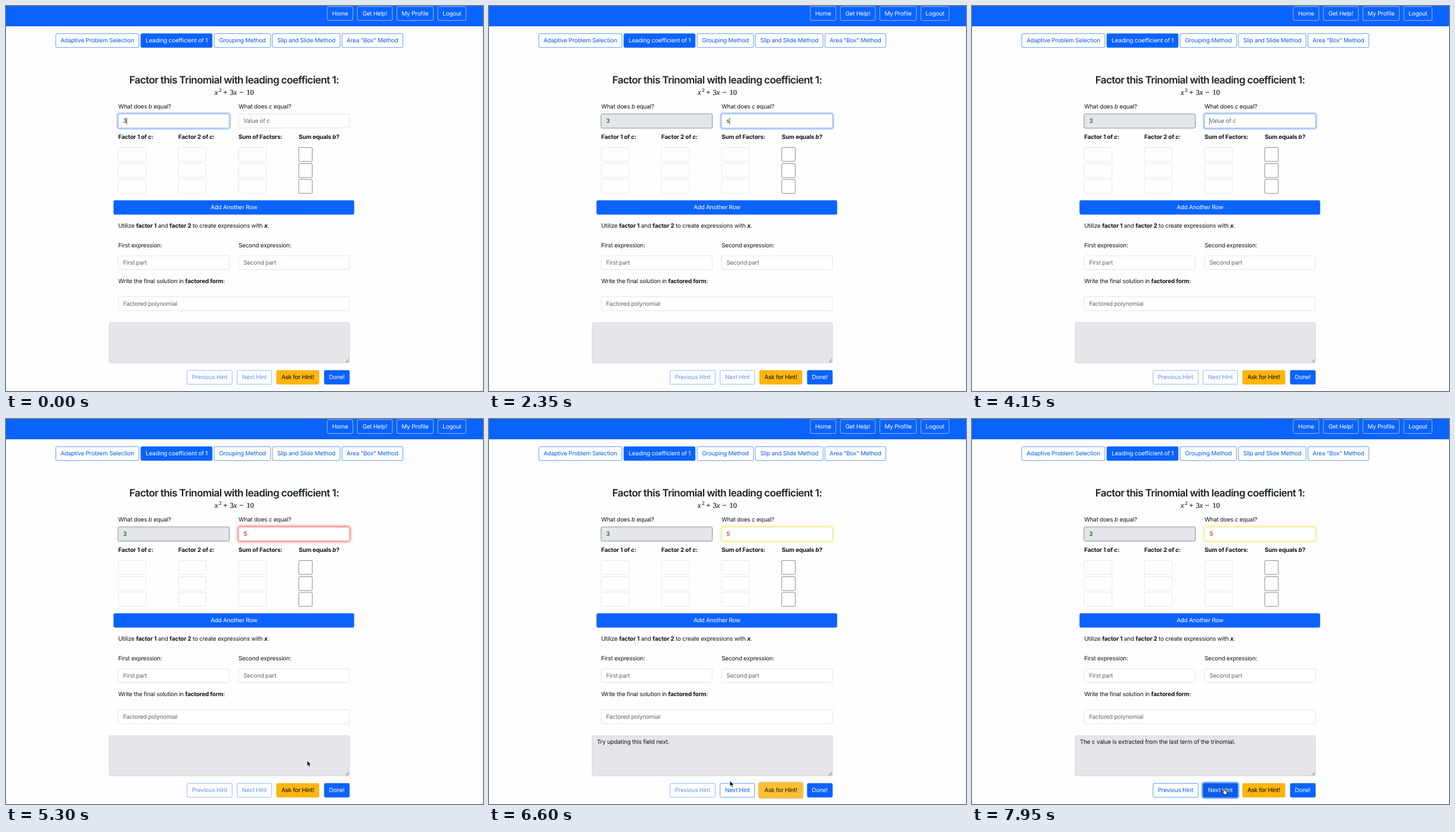
Write an HTML page that moves like this. It is 800 px wide and 646 px high and loops after 8 s.

```html
<!DOCTYPE html>
<html lang="en">
<head>
<meta charset="utf-8">
<title>Factoring practice</title>
<style>
  html, body { margin: 0; width: 100%; height: 100%; overflow: hidden; background: #fefeff; }
  #stage { position: relative; width: 800px; height: 646px; overflow: hidden; background: #fefeff; }
  #page {
    position: absolute; left: 0; top: 0; transform-origin: 0 0;
    font: 15.62px Inter, "Open Sans", sans-serif; letter-spacing: -.019em; color: #101316;
    text-rendering: geometricPrecision; --blue: #0b63fd;
  }
  #page div { position: absolute; box-sizing: border-box; white-space: pre; }
  .text { line-height: 22px; }
  .text b { font-weight: 700; letter-spacing: -.015em; }
  .title { font-size: 27px; font-weight: 600; letter-spacing: -.036em; line-height: 38px; text-align: center; color: #1d2125; }
  .math { font: 19.6px/22px "Liberation Serif", "Noto Serif", serif; letter-spacing: 0; -webkit-text-stroke: .25px; }
  .nav { background: var(--blue); }
  .btn { border: 1px solid; border-radius: 4px; display: flex; align-items: center; justify-content: center; }
  .onNav { color: #fff; border-color: #e4eeff; }
  .outline { color: #0b5fe8; border-color: var(--blue); }
  .solid { color: #fff; background: var(--blue); border-color: var(--blue); }
  .warn { color: #000; background: #fdb60d; border-color: #fdb60d; }
  .field { border: 1px solid #ced4da; border-radius: 4px; background: #fff; padding-left: 12px;
           display: flex; align-items: center; color: #5e666d; }
  .cell { border: 1px solid #d6dadf; border-radius: 4px; background: #fefeff; }
  .check { border: 1px solid #4a4a4a; border-radius: 3px; background: #fff; }
  .area { border: 1px solid #c4c8cd; border-radius: 4px; background: #e5e6eb; }
  .focus { border: 1px solid #86b0fb; border-radius: 4px; box-shadow: 0 0 0 4px #b7cffd; }
  .right { border: 1px solid #86a189; border-radius: 4px; background: #e5e6eb; box-shadow: 0 0 3px #5d7d60; }
  .wrong { border: 1px solid #fb7570; border-radius: 4px; box-shadow: 0 0 8px 1px #fa4a46; }
  .marked { border: 1px solid #f3ee8b; border-radius: 4px; box-shadow: 0 0 8px 1px #f7f060; }
  .warnFocus { background: #fcc02f; border-color: #e9b02c; box-shadow: 0 0 0 4px #ebcd85; }
  .blueFocus { background: #0b5cec; box-shadow: 0 0 0 4px #88b1fb; }
  .caret { background: #111; }
  svg { position: absolute; left: 0; top: 0; overflow: visible; }
</style>
</head>
<body>
<div id="stage"><div id="page"></div></div>
<script>
const LOOP = 8000;
// The page is laid out at full size and shown scaled down; helpers take stage pixels.
const SCALE = .6306;
const COLUMN = 160 * SCALE, HEIGHT = 38 * SCALE, HALF = 296 * SCALE;
const LEFT = 188.2, MIDDLE = LEFT + 2 * COLUMN;
const stage = document.getElementById('stage');
const page = document.getElementById('page');
page.style.transform = `scale(${SCALE})`;

const px = v => v / SCALE + 'px';
function box(x, y, w, h, cls, html = '') {
  const el = document.createElement('div');
  el.className = cls;
  Object.assign(el.style, { left: px(x), top: px(y), width: px(w), height: px(h) });
  el.innerHTML = html;
  page.append(el);
  return el;
}
function text(x, middle, html, cls = '') {
  const el = box(x, middle - 11 * SCALE, 0, 22 * SCALE, 'text ' + cls, html);
  el.style.width = 'auto';
  return el;
}
const button = (x, y, right, cls, label) => box(x, y, right - x, HEIGHT, 'btn ' + cls, label);
const field = (x, y, w, hint) => box(x, y, w, HEIGHT, 'field', hint);

// Navigation and method tabs
box(0, 0, 800, 34.3, 'nav');
button(538.7, .6, 582, 'onNav', 'Home');
button(589, .6, 648, 'onNav', 'Get Help!');
button(655.3, .6, 717, 'onNav', 'My Profile');
button(724, .6, 772, 'onNav', 'Logout');
button(83, 46, 223.3, 'outline', 'Adaptive Problem Selection');
button(226, 46, 346.5, 'solid', 'Leading coefficient of 1');
button(349, 46, 444, 'outline', 'Grouping Method');
button(446.5, 46, 560.7, 'outline', 'Slip and Slide Method');
button(563, 46, 666, 'outline', 'Area "Box" Method');

// Problem statement
box(182.5, 112, 400, 24, 'title', 'Factor this Trinomial with leading coefficient 1:');
[[350, '<i>x</i>'], [364.3, '+'], [375.5, '3<i>x</i>'], [391.3, '−'], [403.3, '10']]
  .forEach(([x, part]) => text(x, 146, part, 'math'));
text(357.3, 142, '2', 'math').style.fontSize = '13.5px';

// Coefficients
text(LEFT, 169, 'What does <i>b</i> equal?');
text(MIDDLE, 169, 'What does <i>c</i> equal?');
field(LEFT, 181, HALF, '');
field(MIDDLE, 181, HALF, '');

// Factor table
['Factor 1 of <i>c</i>:', 'Factor 2 of <i>c</i>:', 'Sum of Factors:', 'Sum equals <i>b</i>?']
  .forEach((head, col) => {
    const x = LEFT + col * COLUMN;
    text(x, 220, `<b>${head}</b>`);
    for (let row = 0; row < 3; row++)
      box(x, 237.4 + row * 26.7, col < 3 ? 47 : 23.3, HEIGHT, col < 3 ? 'cell' : 'check');
  });
button(180.6, 325.8, 584.2, 'solid', 'Add Another Row');

// Expressions and solution
text(LEFT, 369, 'Utilize <b>factor 1</b> and <b>factor 2</b> to create expressions with <b><i>x</i></b>.');
text(LEFT, 401.5, 'First expression:');
text(MIDDLE, 401.5, 'Second expression:');
field(LEFT, 418.8, HALF, 'First part');
field(MIDDLE, 418.8, HALF, 'Second part');
text(LEFT, 462.3, 'Write the final solution in <b>factored form</b>:');
field(LEFT, 487.2, 616 * SCALE, 'Factored polynomial');

// Hint area
box(172.8, 530.8, 640 * SCALE, 68.5, 'area');
const hint = text(181, 542.5, '');
const prev = button(303.3, 611, 379.5, 'outline', 'Previous Hint');
const next = button(387.3, 611, 445.7, 'outline', 'Next Hint');
button(453.5, 611, 525.3, 'warn', 'Ask for Hint!');
button(533.2, 611, 576.3, 'solid', 'Done!');

// Overlays: [element, fade-in start, fade-out start]
const overB = cls => box(LEFT, 181, HALF, HEIGHT, cls);
const overC = cls => box(MIDDLE, 181, HALF, HEIGHT, cls);
const overNext = cls => button(387.3, 611, 445.7, cls, 'Next Hint');
const fades = [
  [overB('focus'), -500, 900],
  [overB('right'), 900, 9e9],
  [overC('focus'), 1700, 2800],
  [overC('wrong'), 2800, 3500],
  [overC('focus'), 3500, 5100],
  [overC('wrong'), 5100, 5800],
  [overC('marked'), 5800, 9e9],
  [button(453.5, 611, 525.3, 'warnFocus', 'Ask for Hint!'), 5750, 7250],
  [overNext('solid'), 6900, 9e9],
  [overNext('solid blueFocus'), 7250, 9e9],
];
const valueB = text(196.4, 193.2, '3');
const valueC = text(398.2, 193.2, '');
const caret = box(0, 187, .8, 12, 'caret');

stage.insertAdjacentHTML('beforeend', `<svg width="800" height="646">
  <path d="M569.7 597.8l5-5M572.6 597.8l2.1-2.1" stroke="#555" stroke-width=".8"/>
  <g id="arrow"><path d="M0 0V9.6L2.2 7.6L3.8 11.2L5.5 10.4L3.9 7H6.8Z" fill="#000" stroke="#fff" stroke-width=".8"/></g>
  <g id="beam"><path d="M-2-5.5Q0-5.5 0-4Q0-5.5 2-5.5M0-4V4M-2 5.5Q0 5.5 0 4Q0 5.5 2 5.5" fill="none" stroke="#222"/></g>
  <g id="hand"><path d="M-1.2-4Q0-5.5 1-4V-.8Q2.4-1.4 3-.3Q4.4-.5 4.7.6V3Q4.5 4.7 3.6 6H-1.2Q-2 0-4 1.6Q-3.3-.3-1.2 1.4Z"
    fill="#fff" stroke="#000" stroke-width=".9" stroke-linejoin="round"/><path d="M1-.8V1.4M3-.3V1.6" stroke="#000" stroke-width=".6"/></g>
</svg>`);
const pointers = ['arrow', 'beam', 'hand'].map(id => document.getElementById(id));

// Pointer stops: time, x, y, shape shown from then on
const path = [
  [0, 322, 216, ''], [550, 322, 216, 'arrow'], [900, 345, 222, 'arrow'], [1400, 414, 205, 'arrow'],
  [1550, 432, 196, 'beam'], [1700, 438, 194, 'beam'], [2100, 438, 194, ''], [2450, 438, 194, 'beam'],
  [2600, 392, 209, 'arrow'], [2800, 339, 233, 'arrow'], [3100, 339, 233, 'arrow'],
  [3400, 425, 199, 'beam'], [3500, 432, 194, 'beam'], [3800, 432, 194, ''],
  [4750, 450, 215, 'arrow'], [5100, 505, 573, 'arrow'], [5350, 505, 573, 'arrow'],
  [5550, 492, 617, 'hand'], [5750, 489, 622, 'hand'], [6200, 482, 622, 'hand'],
  [6350, 450, 615, 'arrow'], [6600, 404, 607, 'arrow'], [6900, 418, 621, 'hand'],
  [7250, 423, 624, 'hand'], [LOOP, 423, 624, 'hand'],
];
// Contents of the c field and the hint area over time
const typed = [[0, ''], [2150, 's'], [3850, ''], [4500, '5']];
const hints = [[0, ''], [5800, 'Try updating this field next.'],
  [7300, 'The c value is extracted from the last term of the trinomial.']];
const carets = [[0, 900, 202.3], [1700, 2150, 398], [2150, 2800, 403.5],
  [3500, 3850, 403.5], [3850, 4500, 398], [4500, 5100, 404.5]];

const clamp = v => Math.min(1, Math.max(0, v));
const ease = v => v * v * (3 - 2 * v);
const ramp = (t, start) => ease(clamp((t - start) / 150));
const latest = (table, t) => table.filter(row => row[0] <= t).pop();
function setText(el, value) { if (el.textContent !== value) el.textContent = value; }

function draw(t) {
  for (const [el, from, to] of fades) el.style.opacity = ramp(t, from) * (1 - ramp(t, to));

  const checked = t >= 900;
  valueB.style.color = checked ? '#145a18' : '#101316';
  valueB.style.fontWeight = checked ? 500 : 400;

  const entry = latest(typed, t)[1];
  const judged = (t >= 2800 && t < 3500) || t >= 5100;
  setText(valueC, entry || 'Value of c');
  valueC.style.color = !entry ? '#5e666d' : judged ? '#ea3a34' : '#101316';
  valueC.style.fontWeight = judged && entry ? 600 : 400;

  setText(hint, latest(hints, t)[1]);
  next.style.opacity = t < 5800 ? .65 : 1;
  prev.style.opacity = t < 7300 ? .65 : 1;

  const spot = carets.find(([from, to]) => t >= from && t < to);
  caret.style.opacity = spot && (t - spot[0]) % 1000 < 500 ? 1 : 0;
  if (spot) caret.style.left = px(spot[2]);

  const i = Math.max(0, path.findIndex(stop => stop[0] > t) - 1);
  const [t0, x0, y0, shape] = path[i], [t1, x1, y1] = path[i + 1];
  const k = ease(clamp((t - t0) / (t1 - t0)));
  for (const p of pointers) {
    p.style.display = p.id === shape ? '' : 'none';
    p.setAttribute('transform', `translate(${x0 + (x1 - x0) * k} ${y0 + (y1 - y0) * k})`);
  }
}

const start = performance.now();
function tick() {
  draw((performance.now() - start) % LOOP);
  requestAnimationFrame(tick);
}
tick();
</script>
</body>
</html>
```
